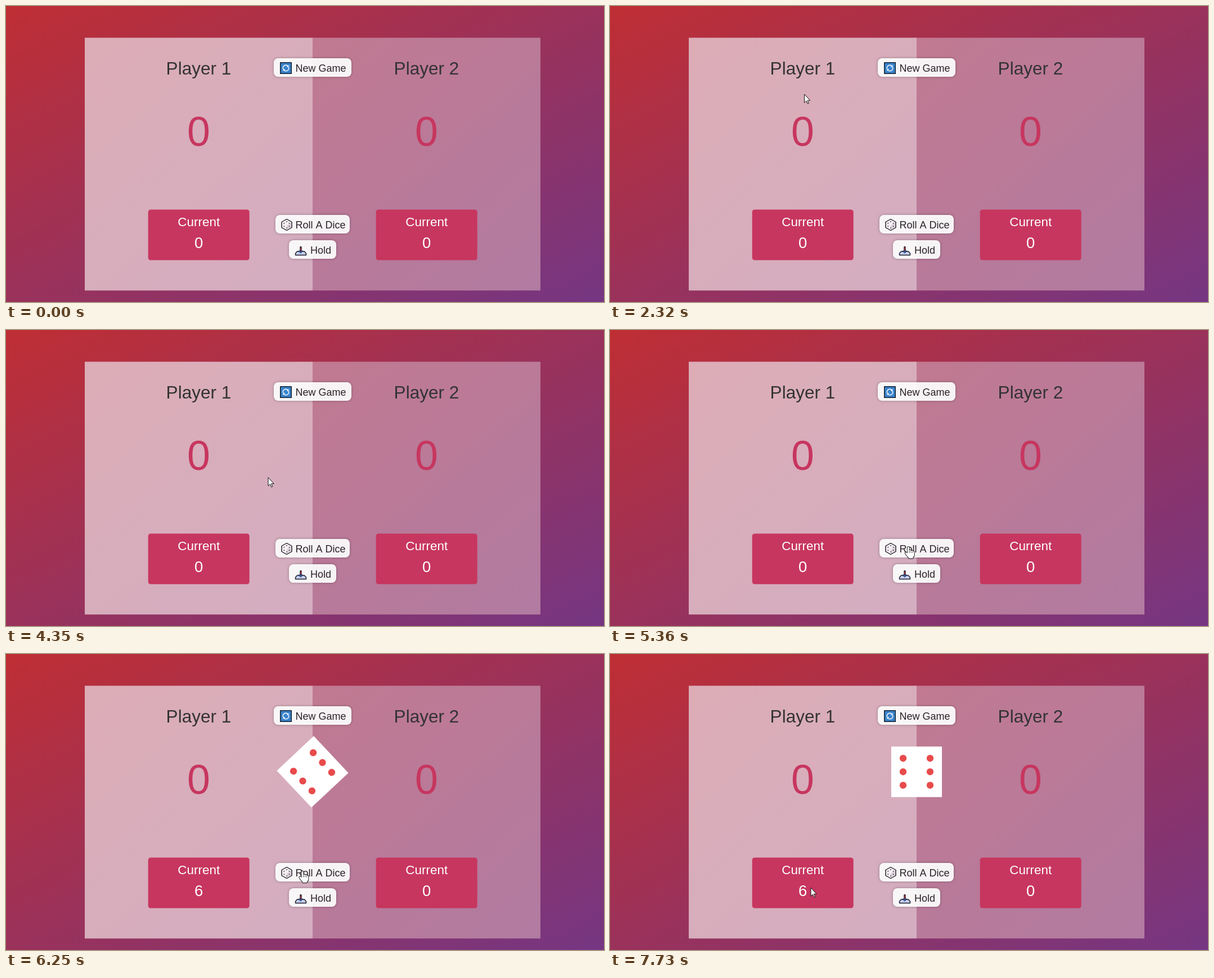
Write an HTML page with a canvas that moves like this. It is 1063 px wide and 527 px high and loops after 8 s.

```html
<!DOCTYPE html>
<html lang="en">
<head>
<meta charset="utf-8">
<title>Dice game</title>
<style>
  html, body { margin: 0; width: 100%; height: 100%; overflow: hidden; background: #9b3159; }
  canvas { display: block; width: 1063px; height: 527px; }
</style>
</head>
<body>
<canvas id="stage" width="1063" height="527"></canvas>
<script>
const W = 1063, H = 527, LOOP = 8000, MID = 545;
const ROLL_AT = 5770, SPIN_START = 5777, SPIN_TIME = 800;
const PINK = '#c7365f', INK = '#2b2129';
const ctx = document.getElementById('stage').getContext('2d');

// Pointer moves: straight lines or Bézier curves; the pointer rests in between
const moves = [
  { from: 420, to: 480, curve: [[1017, 513], [1044, 522]], leaves: true },
  { from: 1580, to: 2330, curve: [[784, 520], [720, 40], [95, 130], [354, 158]] },
  { from: 2430, to: 3190, curve: [[354, 158], [510, 100], [120, 100], [357, 156]] },
  { from: 3240, to: 4030, curve: [[357, 156], [361, 245], [1010, 250], [600, 293]] },
  { from: 4060, to: 4790, curve: [[583, 293], [480, 390], [335, 20], [555, 384]] },
  { from: 5150, to: 5450, curve: [[555, 384], [520, 386]] },
  { from: 5770, to: 5950, curve: [[520, 386], [527, 386]] },
  { from: 6300, to: 6600, curve: [[527, 386], [530, 427]] },
  { from: 6600, to: 7110, curve: [[530, 427], [495, 157], [715, 250], [494, 350]] },
  { from: 7320, to: 7730, curve: [[494, 350], [356.5, 416]] }
];

const BUTTON_H = 33;
const buttons = [
  { y: 93, w: 138, label: 'New Game', textX: 514.5, icon: refreshIcon },
  { y: 372, w: 132, label: 'Roll A Dice', textX: 514.5, icon: diceIcon },
  { y: 417, w: 84, label: 'Hold', textX: 541, icon: trayIcon }
];

function along(points, u) {
  while (points.length > 1)
    points = points.slice(1).map((p, i) => p.map((v, k) => points[i][k] * (1 - u) + v * u));
  return points[0];
}

function pointerAt(t) {
  const move = moves.filter(m => t >= m.from).pop();
  if (!move || (move.leaves && t >= move.to)) return null;
  return along(move.curve, Math.min(1, (t - move.from) / (move.to - move.from)));
}

// The standard CSS "ease" curve
function ease(x) {
  if (x <= 0) return 0;
  if (x >= 1) return 1;
  const curve = [[0, 0], [0.25, 0.1], [0.25, 1], [1, 1]];
  let lo = 0, hi = 1;
  for (let n = 0; n < 20; n++) {
    const mid = (lo + hi) / 2;
    if (along(curve, mid)[0] < x) lo = mid; else hi = mid;
  }
  return along(curve, lo)[1];
}

// Red-to-purple gradient that has the share s at (x, y) and grows by (gx, gy) per pixel
function fade(x, y, s, gx, gy) {
  const n = gx * gx + gy * gy;
  const at = v => [x + gx * (v - s) / n, y + gy * (v - s) / n];
  const g = ctx.createLinearGradient(...at(0), ...at(1));
  g.addColorStop(0, '#bf2e34');
  g.addColorStop(1, '#753682');
  return g;
}

const backdrop = fade(W / 2, H / 2, 0.5, 0.5 / W, 0.5 / H);
const blurred = fade(MID, 281, 0.52, 0.37 / W, 0.21 / H);

function text(str, x, y, size, color, align = 'center') {
  ctx.font = `${size}px "Liberation Sans", Arial, sans-serif`;
  ctx.textAlign = align;
  ctx.fillStyle = color;
  ctx.fillText(str, x, y);
}

function box(x, y, w, h, r, color) {
  ctx.beginPath();
  ctx.roundRect(x, y, w, h, r);
  ctx.fillStyle = color;
  ctx.fill();
}

function dot(x, y, r, color) {
  ctx.beginPath();
  ctx.arc(x, y, r, 0, Math.PI * 2);
  ctx.fillStyle = color;
  ctx.fill();
}

function shape(d, fill, stroke, width = 1) {
  const p = new Path2D(d);
  ctx.lineWidth = width;
  ctx.lineJoin = ctx.lineCap = 'round';
  if (fill) { ctx.fillStyle = fill; ctx.fill(p); }
  if (stroke) { ctx.strokeStyle = stroke; ctx.stroke(p); }
}

function placed(x, y, angle, draw) {
  ctx.save();
  ctx.translate(x, y);
  ctx.rotate(angle);
  draw();
  ctx.restore();
}

function refreshIcon() {
  placed(497.5, 110.5, 0, () => {
    box(-10.5, -10.5, 21, 21, 0.5, '#14202e');
    box(-9, -9, 18, 18, 0, '#3a84cd');
    for (const turn of [0, Math.PI]) {
      placed(0, 0, turn, () => {
        shape('M-5 1A5 5 0 0 1 3.6 -3.5', null, '#fff', 1.4);
        shape('M5 -5.6V-1.8H1.2Z', '#fff');
      });
    }
  });
}

function diceIcon() {
  placed(499, 389.5, 0, () => {
    shape('M0 -10L9 -5V5L0 10L-9 5V-5Z', '#f5eff3', '#1d1820', 1.4);
    shape('M0 1V9L8 4.5V-4Z', '#ddd3db');
    for (let i = 0; i < 6; i++) {
      const a = (i + 0.5) * Math.PI / 3;
      dot(5.4 * Math.cos(a), 5.4 * Math.sin(a), 1, '#4a3f48');
    }
  });
}

function trayIcon() {
  placed(524, 436, 0, () => {
    shape('M-6.5 1H6.5L9.5 4.5V7.5H-9.5V4.5Z', '#c5d0f0', '#1a1b2c', 1.4);
    shape('M0 -6.5V0', null, '#1a1b2c', 3.4);
    shape('M0 -6V0', null, '#a6303c', 1.6);
    shape('M-4 0H4L0 4Z', '#2f62b5', '#1a1b2c', 0.8);
  });
}

function drawButton(b) {
  const x = MID - b.w / 2;
  ctx.save();
  ctx.shadowColor = 'rgba(0,0,0,.3)';
  ctx.shadowBlur = 5;
  box(x, b.y, b.w, BUTTON_H, 8, 'rgba(255,255,255,.93)');
  ctx.restore();
  b.icon();
  text(b.label, b.textX, b.y + 24, 18, INK, 'left');
}

function drawPlayer(n, current) {
  const x = n === 1 ? MID - 405 : MID, cx = x + 202.4;
  for (const color of [blurred, `rgba(255,255,255,${n === 1 ? 0.6 : 0.35})`]) {
    ctx.fillStyle = color;
    ctx.fillRect(x, 56.5, 405, 450);
  }
  text('Player ' + n, cx, 122, 31.5, '#333');
  text('0', cx, 248.5, 73.5, PINK);
  box(cx - 89.7, 362.5, 180, 90, 4.5, PINK);
  text('Current', cx + 0.3, 392, 22.5, '#fff');
  text(current, cx + 0.3, 430.5, 27.5, '#fff');
}

function drawDie(t) {
  placed(MID, 209.7, 2 * Math.PI * ease((t - SPIN_START) / SPIN_TIME), () => {
    box(-45, -45, 90, 90, 0, '#fff');
    for (const x of [-24, 24])
      for (const y of [-24, 0, 24]) dot(x, y, 6.2, '#e84b4b');
  });
}

function isOver(b, x, y) {
  return Math.abs(x - MID) <= b.w / 2 && y >= b.y && y <= b.y + BUTTON_H;
}

function drawPointer([x, y]) {
  placed(x, y, 0, () => {
    if (buttons.some(b => isOver(b, x, y))) {
      const hand = 'M0 2V16M3.2 8V16M6.2 8.6V16M8.8 9.8V16M-4 12L0 17M1 17H8M1.5 19.5H7';
      shape(hand, null, '#111', 5);
      shape(hand, null, '#fff', 3.2);
      shape('M1.6 8V11M4.7 8.6V11M7.6 9.4V11', null, '#111', 0.8);
    } else {
      shape('M.5 .5V15.2L3.9 12L6.2 17.2L8.3 16.3L6 11.2H10.3Z', '#fff', '#111');
    }
  });
}

function render(t) {
  const rolled = t >= ROLL_AT;
  box(0, 0, W, H, 0, backdrop);
  drawPlayer(1, rolled ? '6' : '0');
  drawPlayer(2, '0');
  if (rolled) drawDie(t);
  buttons.forEach(drawButton);
  const pointer = pointerAt(t);
  if (pointer) drawPointer(pointer);
}

const start = performance.now();
function tick() {
  render((performance.now() - start) % LOOP);
  requestAnimationFrame(tick);
}
tick();
</script>
</body>
</html>
```
